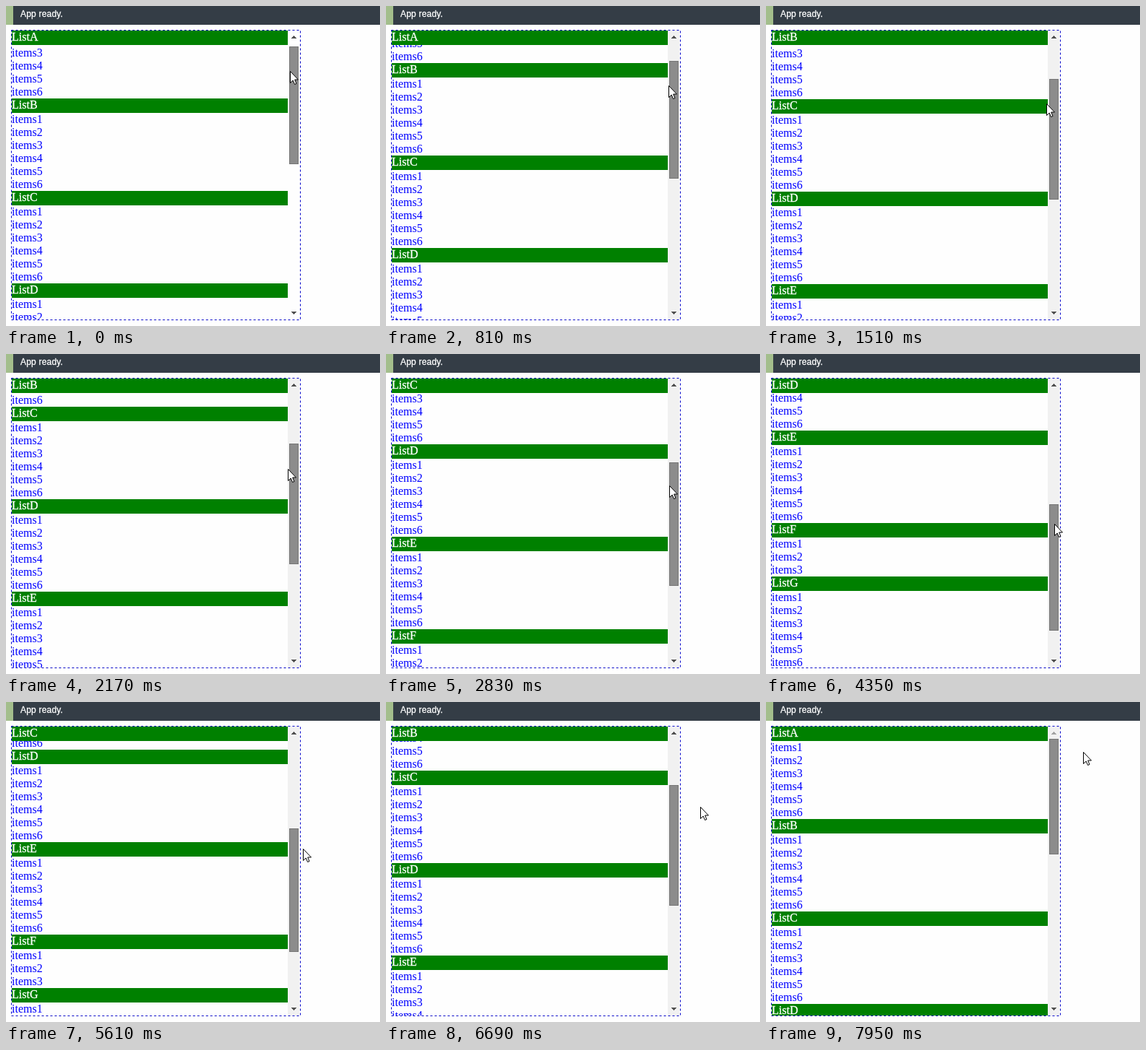
Animation, 519 px wide and 443 px high, one loop 8 s. Source, as an HTML page:

```html
<!DOCTYPE html>
<html lang="en">
<head>
<meta charset="utf-8">
<title>Sticky list headers</title>
<style>
  html, body { margin: 0; width: 100%; height: 100%; overflow: hidden; background: #fefefe; }
  body { position: relative; }
  #bar {
    position: absolute; left: 0; top: 0; right: 0; height: 26px; box-sizing: border-box;
    border-left: 10px solid #a3be8c; background: #343d46; color: #fff; padding-left: 10px;
    font: 12px/22px "Liberation Sans", Arial, sans-serif; letter-spacing: .2px;
    -webkit-text-stroke: .3px;
  }
  #box {
    position: absolute; left: 8px; top: 34px; width: 400px; height: 400px; overflow: hidden;
    font: 16px/18px "Liberation Serif", "Times New Roman", serif; color: #00f;
  }
  #list, #pinned { position: absolute; left: 0; top: 0; width: 383px; }
  .head { height: 20px; background: #008000; color: #fff; -webkit-text-stroke: .3px; }
  .item { height: 18px; }
  #track { position: absolute; left: 383px; top: 0; width: 16px; height: 400px; }
  #thumb {
    position: absolute; left: 2px; width: 13px; box-sizing: border-box;
    background: #8c8c8c; border: 1px solid #757575;
  }
  svg { position: absolute; left: 0; top: 0; overflow: visible; }
</style>
</head>
<body>
<div id="bar">App ready.</div>
<div id="box">
  <div id="list"></div>
  <div id="pinned" class="head"></div>
  <div id="track">
    <svg width="16" height="400" fill="#505050" shape-rendering="crispEdges">
      <path id="up" d="M4.5 11 L8.5 7 L12.5 11Z"/>
      <path d="M4.5 389 L8.5 393 L12.5 389Z"/>
    </svg>
    <div id="thumb"></div>
  </div>
</div>
<svg width="519" height="443">
  <rect x="7.5" y="33.5" width="401" height="401" fill="none" stroke="#0000c8" stroke-dasharray="3"/>
</svg>
<svg id="cursor" width="13" height="20">
  <path d="M.5 .5 V16.5 L4.2 13 L6.6 18.5 L9 17.5 L6.7 12 H11.5Z" fill="#fff" stroke="#000"/>
</svg>
<script>
const LOOP = 8000, STEP = 137;
const VIEW = 400, ARROW = 17, HEAD = 20, ITEM = 18;
const names = [..."ABCDEFGH"];

// Turning points of the drag: time, scroll, pointer x, pointer y
const keys = [
  [0, 14, 394, 90],
  [1510, 121, 389, 135],
  [2830, 233, 393, 182],
  [4350, 360, 400, 235],
  [4630, 372, 401, 240],
  [5610, 292, 412, 203],
  [6690, 155, 436, 145],
  [7950, -29, 440, 69]
];

const $ = id => document.getElementById(id);
const list = $("list"), pinned = $("pinned"), track = $("track");
const thumb = $("thumb"), up = $("up"), cursor = $("cursor");

function addRow(cls, text) {
  const row = document.createElement("div");
  row.className = cls;
  row.textContent = text;
  list.append(row);
}

let total = 0;
for (const name of names) {
  const count = "FH".includes(name) ? 3 : 6;
  addRow("head", "List" + name);
  for (let i = 1; i <= count; i++) addRow("item", "items" + i);
  total += HEAD + count * ITEM;
}

// Moves from key to key in even, visible steps
function sample(t) {
  const next = keys.findIndex(key => key[0] > t);
  if (next < 0) return keys[keys.length - 1].slice(1);
  const a = keys[next - 1], b = keys[next];
  const span = b[0] - a[0];
  const steps = Math.round(span / STEP);
  const p = Math.floor((t - a[0]) / span * steps) / steps;
  return a.slice(1).map((v, i) => Math.round(v + (b[i + 1] - v) * p));
}

function draw(t) {
  const [pos, x, y] = sample(t);
  const scroll = Math.max(0, pos);
  // Each pinned header leaves the flow, so the content shrinks by its height
  const stuck = scroll > 0 ? 1 + Math.floor(scroll / (6 * ITEM)) : 0;
  const height = total - HEAD * stuck;
  const room = VIEW - 2 * ARROW;
  const size = Math.floor(room * VIEW / height);
  const top = ARROW + (room - size) * scroll / (height - VIEW);

  list.style.transform = `translateY(${-(scroll + HEAD * stuck)}px)`;
  pinned.textContent = "List" + names[Math.max(0, stuck - 1)];
  track.style.background = t < STEP ? "#fefefe" : "#f1f1f1";
  thumb.style.top = Math.floor(top) + "px";
  thumb.style.height = (scroll ? size : size + 1) + "px";
  up.setAttribute("fill", scroll ? "#505050" : "#a3a3a3");
  cursor.style.transform = `translate(${x}px, ${y}px)`;
}

function loop() {
  draw(performance.now() % LOOP);
  requestAnimationFrame(loop);
}
loop();
</script>
</body>
</html>
```
